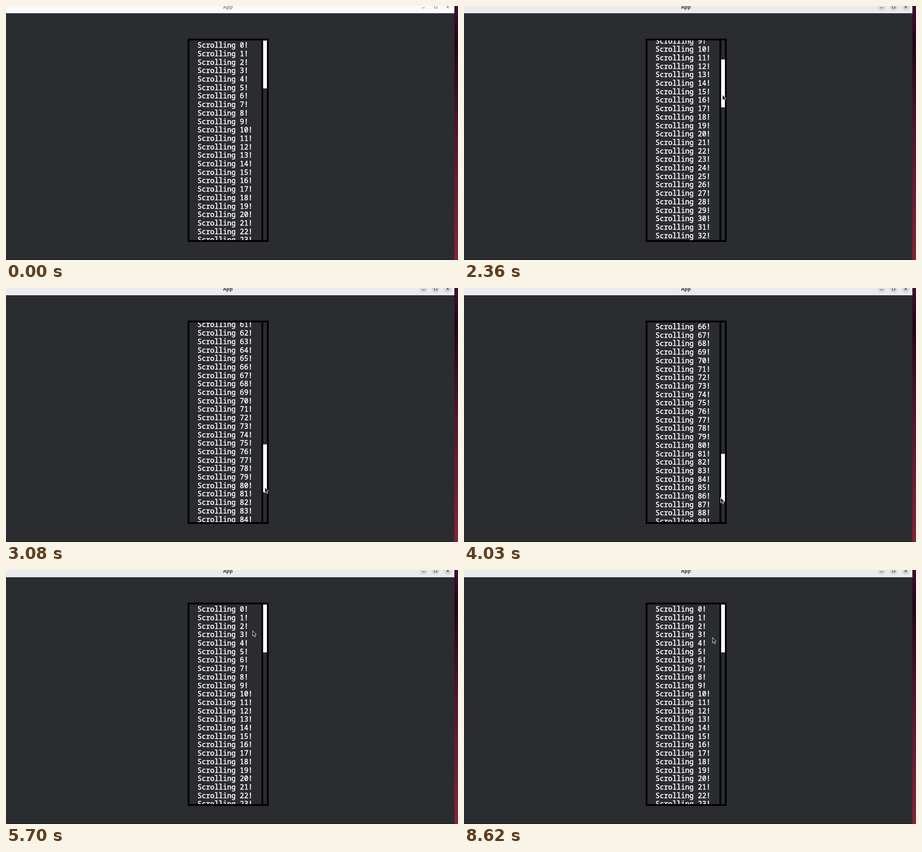
Write an HTML page with a canvas that moves like this. It is 998 px wide and 561 px high and loops after 9430 ms.

```html
<!DOCTYPE html>
<html lang="en">
<head>
<meta charset="utf-8">
<title>App</title>
<style>
html, body { margin: 0; width: 100%; height: 100%; overflow: hidden; background: #2b2c2f; }
canvas { display: block; }
</style>
</head>
<body>
<canvas id="stage" width="998" height="561"></canvas>
<script>
const ctx = document.getElementById('stage').getContext('2d');
const LOOP = 9430, ENTER = 730, FOCUS = 1990;
const TOP = 76, VIEW = 441, ROW = 18.7, ROWS = 100, THUMB = 105.6;
const MAX_SCROLL = ROWS * ROW - VIEW;
const THUMB_RATE = (VIEW - THUMB) / MAX_SCROLL;
const POINTER_RATE = 1.075 * THUMB_RATE;

// Pointer tip apart from the drag: [time, x, y]
const path = [
  [ENTER, 737, 1], [1560, 570, 151], [3080, 571.5, 151], [3480, 576, 151], [4030, 566.5, 151],
  [4580, 576.5, 151], [4910, 573.5, 115], [5280, 573.5, 115], [5700, 544.5, 134],
  [8490, 544.5, 134], [8620, 548.5, 149]
];
// List offset while the thumb is dragged down and back: [time, offset]
const drag = [
  [2100, 0], [2360, 177], [3080, 1145.5], [3480, MAX_SCROLL],
  [3780, MAX_SCROLL], [4030, 1236.5], [4580, 90.5], [4690, 0]
];

const clamp = (v, lo, hi) => Math.max(lo, Math.min(hi, v));

function slope(keys, i, c) {
  const a = keys[i], b = keys[i + 1];
  return a && b ? (b[c] - a[c]) / (b[0] - a[0]) : 0;
}

function tangent(keys, i, c) {
  const p = slope(keys, i - 1, c), q = slope(keys, i, c);
  return p * q > 0 ? 2 * p * q / (p + q) : 0;
}

// Monotone cubic through the keys
function sample(keys, t, c) {
  if (t <= keys[0][0]) return keys[0][c];
  const i = keys.findIndex(k => k[0] > t) - 1;
  if (i < 0) return keys[keys.length - 1][c];
  const a = keys[i], b = keys[i + 1], d = b[0] - a[0], u = (t - a[0]) / d;
  const s = u * u * (3 - 2 * u);
  return a[c] + (b[c] - a[c]) * s + d * u * (1 - u) *
    ((1 - u) * tangent(keys, i, c) - u * tangent(keys, i + 1, c));
}

// Wheel clicks made so far in a run of evenly spaced ones
const clicks = (t, start, gap, count) => clamp(Math.floor((t - start) / gap) + 1, 0, count);

const wheelRows = t => clicks(t, 6380, 40, 3) + clicks(t, 6600, 90, 2) - clicks(t, 7480, 55, 5);

function box(color, x, y, w, h) {
  ctx.fillStyle = color;
  ctx.fillRect(x, y, w, h);
}

function line(x1, y1, x2, y2) {
  ctx.beginPath();
  ctx.moveTo(x1, y1);
  ctx.lineTo(x2, y2);
  ctx.stroke();
}

function drawDesktop() {
  const g = ctx.createLinearGradient(0, 0, 0, 561);
  g.addColorStop(0, '#400f30');
  g.addColorStop(0.14, '#20061a');
  g.addColorStop(0.55, '#571830');
  g.addColorStop(1, '#862338');
  box('#2b2c2f', 0, 0, 990, 561);
  box('#19191b', 0, 560, 990, 1);
  box(g, 990, 0, 8, 561);
}

function drawTitleBar(focused) {
  box(focused ? '#ebebeb' : '#fafafa', 0, 0, 990, 16);
  ctx.font = '700 11px "Open Sans", "Noto Sans", sans-serif';
  ctx.textAlign = 'center';
  ctx.fillStyle = focused ? '#3d3d3d' : '#919191';
  ctx.fillText('App', 490, 6);
  if (focused) {
    ctx.fillStyle = '#d9d9d9';
    for (let i = 0; i < 3; i++) {
      ctx.beginPath();
      ctx.arc(922 + i * 26.7, 2, 8.7, 0, Math.PI * 2);
      ctx.fill();
    }
  }
  ctx.strokeStyle = focused ? '#3d3d3d' : '#777';
  ctx.lineWidth = 1.1;
  line(919, 4, 925, 4);
  ctx.strokeRect(946, -0.8, 5.5, 5.5);
  line(972.4, -1, 978.2, 4.8);
  line(978.2, -1, 972.4, 4.8);
}

function drawList(scroll) {
  box('#000', 401, 72, 179, VIEW + 8);
  box('#2b2c2f', 405, TOP, 159, VIEW);
  box('#2b2c2f', 568, TOP, 8, VIEW);
  box('#fff', 567.7, TOP + 0.4 + scroll * THUMB_RATE, 8.4, THUMB);

  ctx.save();
  ctx.beginPath();
  ctx.rect(405, TOP, 159, VIEW);
  ctx.clip();
  ctx.font = '500 15.6px "Noto Sans Mono", "DejaVu Sans Mono", monospace';
  ctx.textAlign = 'left';
  ctx.fillStyle = ctx.strokeStyle = '#fff';
  ctx.lineWidth = 0.55;
  ctx.lineJoin = 'round';
  const first = Math.max(0, Math.floor(scroll / ROW) - 1);
  for (let i = first; i < Math.min(ROWS, first + 27); i++) {
    const y = 92.2 + i * ROW - scroll;
    ctx.fillText(`Scrolling ${i}!`, 422.8, y);
    ctx.strokeText(`Scrolling ${i}!`, 422.8, y);
  }
  ctx.restore();
}

function drawPointer(x, y) {
  const arrow = new Path2D('M0 0V12.2L2.8 9.8L4.8 14L6.8 13L5 9L8.4 8.6Z');
  ctx.save();
  ctx.translate(x, y);
  ctx.fillStyle = '#232325';
  ctx.strokeStyle = '#e4e4e4';
  ctx.lineWidth = 1;
  ctx.lineJoin = 'round';
  ctx.fill(arrow);
  ctx.stroke(arrow);
  ctx.restore();
}

function draw(t) {
  const dragged = sample(drag, t, 1);
  drawDesktop();
  drawTitleBar(t >= FOCUS);
  drawList(dragged + wheelRows(t) * ROW);
  if (t >= ENTER) drawPointer(sample(path, t, 1), sample(path, t, 2) + dragged * POINTER_RATE);
}

const start = performance.now();
function tick() {
  draw((performance.now() - start) % LOOP);
  requestAnimationFrame(tick);
}
tick();
</script>
</body>
</html>
```
